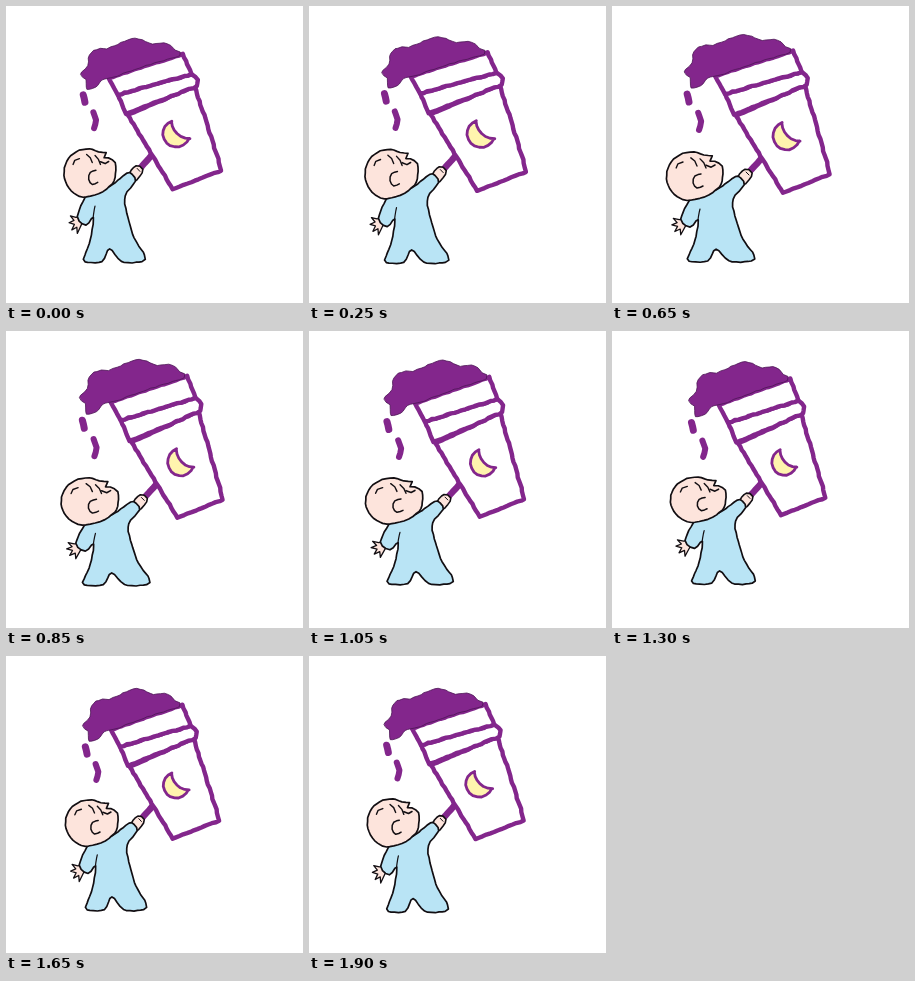
An HTML page that plays this animation: 297x297 px, repeating every 1.95 s.

```html
<!DOCTYPE html>
<html lang="en">
<head>
<meta charset="utf-8">
<title>Baby with a giant cup</title>
<style>
  html, body { margin: 0; width: 100%; height: 100%; overflow: hidden; background: #fff; }
  svg { display: block; width: 100vw; height: 100vh; }
  path { stroke-linecap: round; stroke-linejoin: round; }
</style>
</head>
<body>
<svg id="stage" viewBox="0 0 297 297"></svg>
<script>
const SIZE = 297, LOOP = 1950, STEP = 50, POSE = 650;
const SWAY = 2.5, BOB = 2.1, SAMPLE = 4;
const PURPLE = '#83268c', PLUM = '#4c1555', INK = '#120e12';
const SKIN = '#fde4dc', BLUE = '#b9e4f5', CREAM = '#fff4ae';
const stage = document.getElementById('stage');
const shapes = [];

let seed = 7;
const random = () => (seed = seed * 16807 % 2147483647) / 2147483647;
const jitter = amount => (random() - 0.5) * 2 * amount;

const points = text => text.split(' ').map(p => p.split(',').map(Number));

function arc(cx, cy, rx, ry, from, to, count = 12) {
  return Array.from({ length: count + 1 }, (_, i) => {
    const a = (from + (to - from) * i / count) * Math.PI / 180;
    return [cx + rx * Math.cos(a), cy + ry * Math.sin(a)];
  });
}

const spline = (a, b, c, d, u) => b + u / 2 * (c - a
  + u * (2 * a - 5 * b + 4 * c - d + u * (3 * (b - c) + d - a)));

// Samples a line through the key points with a slightly unsteady hand.
function trace(keys, { closed, smooth, rough }) {
  const n = keys.length, line = [];
  const at = i => closed ? keys[(i + n) % n] : keys[Math.max(0, Math.min(n - 1, i))];
  for (let i = 0; i < (closed ? n : n - 1); i++) {
    const [a, b, c, d] = [at(i - 1), at(i), at(i + 1), at(i + 2)];
    const steps = Math.max(1, Math.round(Math.hypot(c[0] - b[0], c[1] - b[1]) / SAMPLE));
    for (let k = 0; k < steps; k++) {
      const u = k / steps;
      line.push([0, 1].map(axis => jitter(rough) + (smooth
        ? spline(a[axis], b[axis], c[axis], d[axis], u)
        : b[axis] + (c[axis] - b[axis]) * u)));
    }
  }
  return closed ? line : [...line, keys[n - 1]];
}

function draw(keys, fill, stroke, width, options) {
  const style = { closed: true, smooth: true, rough: 0.3, ...options };
  const path = document.createElementNS('http://www.w3.org/2000/svg', 'path');
  path.setAttribute('fill', fill);
  path.setAttribute('stroke', stroke);
  path.setAttribute('stroke-width', width);
  stage.append(path);
  shapes.push({ path, line: trace(keys, style), end: style.closed ? 'Z' : '' });
}
const line = (keys, color, width) => draw(keys, 'none', color, width, { closed: false, rough: 0.2 });
const ink = (text, width = 1.4) => line(points(text), INK, width);
const panel = text => draw(points(text), '#fff', PURPLE, 4.4, { smooth: false, rough: 0.5 });

function drawCup() {
  line(points('151,151 137,166'), PURPLE, 6.5);
  panel('124,110 171,187 218,168 193,79');
  panel('113,88 122,109 195,79 196,72 190,66');
  panel('103,70 113,88 190,66 181,45');
  const moon = [...arc(174.5, 130, 13.5, 14, 20, 252), ...arc(188, 117, 18, 18, 180, 90, 6)];
  draw(moon, CREAM, PURPLE, 2.8, { rough: 0.2 });
}

function drawSpill() {
  const spill = '72,66 80,57 82,46 90,40 101,39 113,35 124,30 136,29 150,34 165,34 174,41 '
    + '178,46 140,58 106,70 96,72 89,80 79,82 78,72';
  draw(points(spill), PURPLE, PLUM, 0.8, { rough: 0.6 });
  line(points('75,88 77,96'), PURPLE, 7);
  line(points('86,107 89,115 87,124'), PURPLE, 6);
}

function drawBaby() {
  draw(points('126,171 133,163 140,167 137,174 130,179'), SKIN, INK, 1.6);
  ink('134,166 137,169', 1);
  const fingers = Array.from({ length: 9 }, (_, i) => arc(71, 218, 1, 1, 85 + i * 18, 0, 1)[0])
    .map(([x, y], i) => [71 + (x - 71) * (i % 2 ? 11 : 6), 218 + (y - 218) * (i % 2 ? 11 : 6)]);
  draw([...fingers, [76, 214]], SKIN, INK, 1.3);

  const suit = '80,192 104,184 116,176 126,170 132,179 121,193 123,210 131,233 142,249 '
    + '139,255 117,255 104,243 96,255 77,255 77,249 83,234 86,214 78,221 69,213';
  draw(points(suit), BLUE, INK, 1.7);
  ink('86,214 88,203', 1.2);

  const face = '100,150 98,155 103,155 110,160 111,168 109,178 104,184 92,191';
  draw([...arc(79.5, 170.5, 25, 24.5, 100, 300), ...points(face)], SKIN, INK, 1.7);
  ink('89,168 83,170 81,177 85,182 91,180', 1.5);
  ink('64,162 66,158 71,156');
  ink('79,152 83,155 85,160');
  ink('88,153 92,157 94,162');
  ink('94,159 99,161 103,159', 1.6);
}

// One wave as long as the stage runs through it along each axis.
const wave = (pos, t) => Math.cos(2 * Math.PI * (t / LOOP + pos / SIZE));
const move = (pos, t, reach) => pos + reach * (wave(pos, t) - wave(pos, POSE));

function render(now) {
  const t = Math.floor(now % LOOP / STEP) * STEP;
  for (const { path, line, end } of shapes) {
    const moved = line.map(([x, y]) => move(x, t, SWAY).toFixed(2) + ',' + move(y, t, BOB).toFixed(2));
    path.setAttribute('d', 'M' + moved.join('L') + end);
  }
}

drawCup();
drawSpill();
drawBaby();
const start = performance.now();
function tick() {
  render(performance.now() - start);
  requestAnimationFrame(tick);
}
tick();
</script>
</body>
</html>
```
